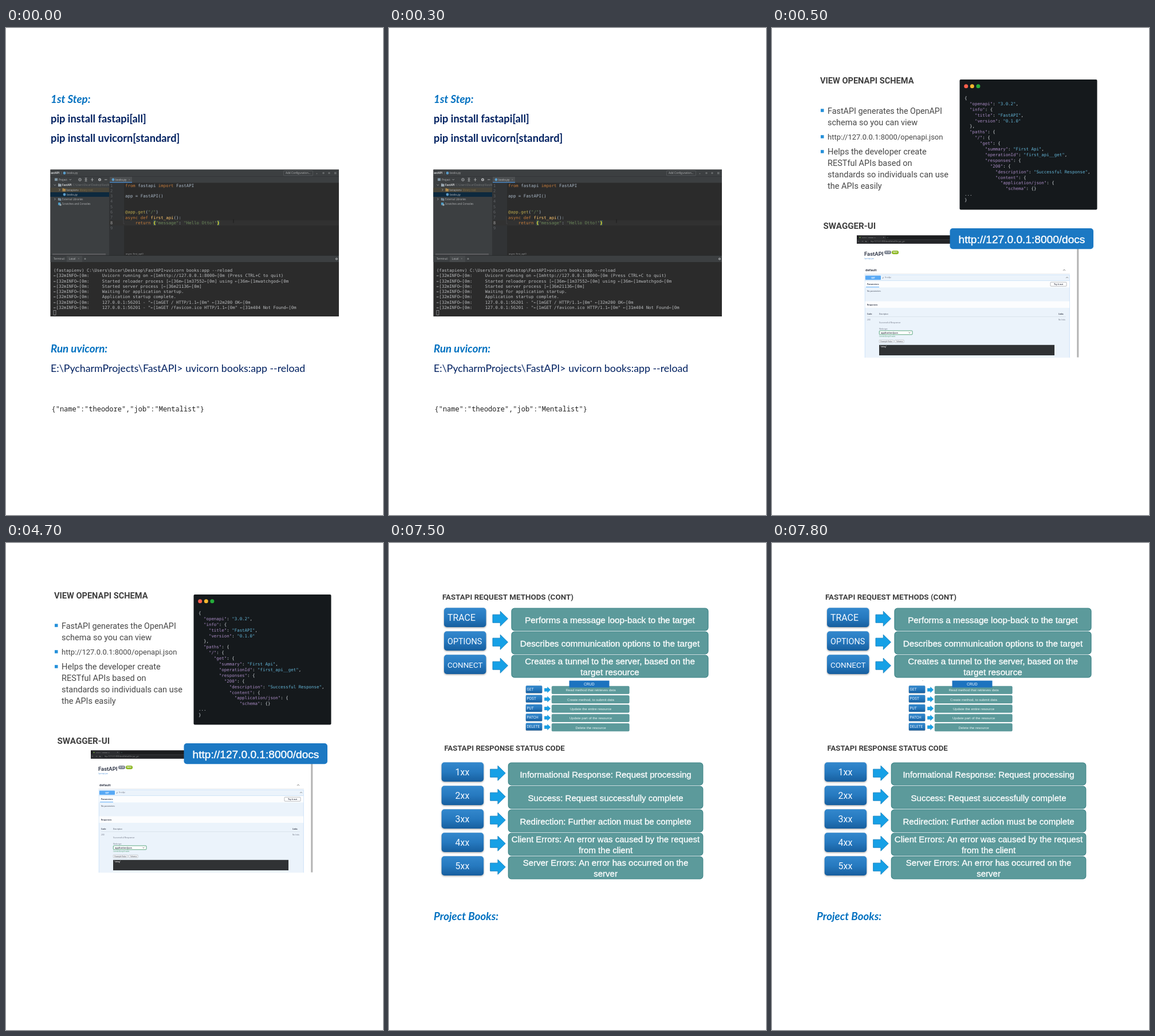
An HTML page with a canvas that plays this animation: 658 by 851 pixels, repeating every 8000 ms.

```html
<!DOCTYPE html>
<html lang="en">
<head>
<meta charset="utf-8">
<title>FastAPI notes</title>
<style>
html, body { margin: 0; width: 100%; height: 100%; overflow: hidden; background: #fff; }
canvas { display: block; width: 658px; height: 851px; }
</style>
</head>
<body>
<canvas id="stage" width="658" height="851"></canvas>
<script>
const ctx = document.getElementById('stage').getContext('2d');
const LATO = 'Lato, sans-serif';
const ROBOTO = 'Roboto, sans-serif';
const ARIAL = '"Liberation Sans", sans-serif';
const OPEN = '"Open Sans", sans-serif';
const MONO = '"DejaVu Sans Mono", monospace';

// y is the middle of the capitals
function text(s, x, y, size, color, family, style = '', align = 'left') {
  ctx.font = `${style} ${size}px ${family}`;
  ctx.textAlign = align;
  ctx.fillStyle = color;
  ctx.fillText(s, x, y + size * 0.36);
}

function runs(x, y, size, parts) {
  for (const [s, color, style] of parts) {
    text(s, x, y, size, color, MONO, style);
    x += ctx.measureText(s).width;
  }
}

function rect(x, y, w, h, color) {
  ctx.fillStyle = color;
  ctx.fillRect(x, y, w, h);
}

function round(x, y, w, h, r, fill, stroke, line = 1) {
  ctx.beginPath();
  ctx.roundRect(x, y, w, h, r);
  if (fill) { ctx.fillStyle = fill; ctx.fill(); }
  if (stroke) { ctx.strokeStyle = stroke; ctx.lineWidth = line; ctx.stroke(); }
}

function dot(x, y, r, color) {
  ctx.beginPath();
  ctx.arc(x, y, r, 0, Math.PI * 2);
  ctx.fillStyle = color;
  ctx.fill();
}

function path(points, color, width = 0.7) {
  ctx.beginPath();
  points.forEach(([x, y]) => ctx.lineTo(x, y));
  ctx.strokeStyle = color;
  ctx.lineWidth = width;
  ctx.stroke();
}

function clipTo(x, y, w, h, draw) {
  ctx.save();
  ctx.beginPath();
  ctx.rect(x, y, w, h);
  ctx.clip();
  draw();
  ctx.restore();
}

/* ---------- setup page ---------- */

function sidebar() {
  const ui = '#b4b6b8';
  const folder = (x, y, c) => { rect(x, y - 2, 5.5, 4.5, c); rect(x, y - 2.8, 2.6, 1, c); };
  rect(77, 279, 103, 8, '#47443a');
  rect(77, 287, 103, 8, '#0d293e');
  path([[83.5, 273.5], [85.2, 275.3], [87, 273.5]], ui);
  folder(91, 274.5, '#9aa7b0');
  text('FastAPI', 98, 274.5, 4.5, '#d0d2d4', OPEN, 'bold');
  text('C:\\Users\\Oscar\\Desktop\\FastAPI', 117, 274.5, 4.4, '#777a7c', OPEN);
  path([[92.5, 281], [94.2, 282.8], [92.5, 284.6]], ui);
  folder(98.5, 283, '#b08a4c');
  text('fastapienv', 105, 283, 4.5, ui, OPEN);
  text('library root', 129, 283, 4.4, '#85754c', OPEN);
  dot(102, 291, 2.4, '#5a9bc8');
  text('books.py', 106, 291, 4.5, '#c4c6c8', OPEN);
  path([[84.5, 297.2], [86.2, 299], [84.5, 300.8]], ui);
  for (let i = 0; i < 3; i++) rect(91 + i * 1.9, 297 + i * 0.4, 1.3, 4.3, '#8fa9bb');
  text('External Libraries', 98, 299, 4.5, ui, OPEN);
  rect(91, 305, 4.2, 4.5, '#4b9bc4');
  dot(95, 309, 1.8, '#9aa7b0');
  text('Scratches and Consoles', 98, 307.3, 4.5, ui, OPEN);
  rect(81, 394, 93, 2.6, '#58595b');
}

function editor() {
  const orange = '#c27a3a', plain = '#a9b7c6', green = '#6a8759', gold = '#b9a64c';
  const row = n => 275 + (n - 1) * 9.32;
  rect(180, 336, 401, 9, '#313131');
  for (let n = 1; n <= 9; n++) text(n, 182, row(n), 7, n === 8 ? '#a4a3a3' : '#606366', MONO);
  const code = {
    1: [['from ', orange], ['fastapi ', plain], ['import ', orange], ['FastAPI', plain]],
    3: [['app = FastAPI()', plain]],
    6: [['@app.get', gold], ['(', plain], ['"/"', green], [')', plain]],
    7: [['async def ', orange], ['first_api', '#ffc66d'], ['():', plain]]
  };
  for (const n in code) runs(208, row(n), 7.4, code[n]);
  rect(257, 336, 4.5, 9, '#3b514d');
  rect(368.5, 336, 4.5, 9, '#3b514d');
  runs(208, row(8), 7.4, [['    return ', orange], ['{', '#ffef28', 'bold'], ['"message"', green],
    [': ', plain], ['"Hello Otto!"', green], ['}', '#ffef28', 'bold']]);
  path([[205, 329], [205, 342], [207, 342]], '#505254', 0.5);
  path([[397, 334.5], [397, 340.5]], '#191919', 0.8);
  text('async first_api()', 209, 394, 4.3, '#a0a2a4', OPEN);
}

function terminal() {
  const lines = [
    'Uvicorn running on ←[1mhttp://127.0.0.1:8000←[0m (Press CTRL+C to quit)',
    'Started reloader process [←[36m←[1m37552←[0m] using ←[36m←[1mwatchgod←[0m',
    'Started server process [←[36m21136←[0m]',
    'Waiting for application startup.',
    'Application startup complete.',
    '127.0.0.1:56201 - "←[1mGET / HTTP/1.1←[0m" ←[32m200 OK←[0m',
    '127.0.0.1:56201 - "←[1mGET /favicon.ico HTTP/1.1←[0m" ←[31m404 Not Found←[0m'
  ];
  rect(77, 398, 504, 11, '#3c3f41');
  rect(106, 398, 27, 11, '#46494b');
  text('Terminal:', 83, 403.5, 4.6, '#b4b6b8', OPEN);
  text('Local', 110, 403.5, 4.6, '#c4c6c8', OPEN);
  text('×', 125.5, 403.5, 4.6, '#85888a', OPEN);
  text('+', 136, 403.5, 7, '#c4c6c8', OPEN);
  dot(577, 403.5, 2, '#a4a6a8');
  dot(577, 403.5, 0.8, '#3c3f41');
  const gray = '#b9bbbd';
  text('(fastapienv) C:\\Users\\Oscar\\Desktop\\FastAPI>uvicorn books:app --reload', 83, 423.3, 7.42, gray, MONO);
  lines.forEach((s, i) => text('←[32mINFO←[0m:     ' + s, 83, 432.6 + i * 9.3, 7.42, gray, MONO));
  ctx.strokeStyle = '#a0a2a4';
  ctx.lineWidth = 0.7;
  ctx.strokeRect(83, 493.5, 4, 8);
}

function ide() {
  const ui = '#b4b6b8';
  rect(77, 247, 504, 257, '#2b2b2b');
  rect(77, 247, 504, 23.5, '#3c3f41');
  rect(77, 270, 103, 127.5, '#3c3f41');
  rect(180, 270, 26, 127.5, '#313335');
  rect(77, 259, 504, 0.7, '#303234');
  rect(77, 397.3, 504, 0.8, '#292b2d');
  text('FastAPI', 75.5, 253.5, 4.8, '#d0d2d4', OPEN, 'bold');
  rect(96.5, 251, 0.6, 5, '#6b6e70');
  dot(102, 253.5, 2.4, '#5a9bc8');
  text('books.py', 106, 253.5, 4.6, ui, OPEN);
  round(484.5, 249.5, 51, 8.5, 1, null, '#616466', 0.6);
  text('Add Configuration...', 488, 253.5, 4.7, ui, OPEN);
  text('▸', 541, 253.5, 6, '#6b6e70', MONO);
  dot(554, 253.5, 1.8, '#66696b');
  dot(564, 253.5, 1.8, '#66696b');
  rect(573, 251.8, 3.6, 3.6, '#66696b');
  // project tool bar
  rect(85, 262.5, 5, 4.6, '#7f96a5');
  text('Project', 92, 265, 4.6, ui, OPEN);
  path([[110.5, 264], [112.2, 265.8], [114, 264]], ui);
  ctx.beginPath();
  ctx.arc(129, 265, 2.3, 0, 7);
  ctx.strokeStyle = ui;
  ctx.lineWidth = 0.9;
  ctx.stroke();
  dot(129, 265, 0.7, ui);
  for (const x of [139.5, 150.5]) {
    path([[x - 2.3, 265], [x + 2.3, 265]], ui, 0.8);
    path([[x, 262], [x, 268]], ui, 0.8);
  }
  path([[137.5, 262.2], [141.5, 262.2]], ui);
  path([[137.5, 267.8], [141.5, 267.8]], ui);
  dot(163.5, 265, 2.5, ui);
  dot(163.5, 265, 0.9, '#3c3f41');
  path([[172, 265], [176.5, 265]], ui, 0.9);
  rect(181, 260, 39, 10, '#4b4e50');
  rect(181, 269, 39, 1.4, '#4a88c7');
  dot(187, 265, 2.4, '#5a9bc8');
  text('books.py', 191, 265, 4.6, '#c4c6c8', OPEN);
  text('×', 214, 265, 4.6, '#85888a', OPEN);
  clipTo(77, 270, 103, 127.5, sidebar);
  editor();
  terminal();
}

function setupPage() {
  const blue = '#0070c0', navy = '#002060', head = 'italic bold';
  text('1st Step:', 78, 124, 18.8, blue, LATO, head);
  text('pip install fastapi[all]', 78, 158, 18.3, navy, LATO, 'bold');
  text('pip install uvicorn[standard]', 78, 192, 18.3, navy, LATO, 'bold');
  clipTo(77.5, 247.5, 503.5, 256.5, ide);
  text('Run uvicorn:', 78, 560.5, 18.8, blue, LATO, head);
  text('E:\\PycharmProjects\\FastAPI> uvicorn books:app --reload', 78, 594.5, 17.8, navy, LATO);
  text('{"name":"theodore","job":"Mentalist"}', 79.5, 665.3, 12, '#222', '"Noto Sans Mono", monospace');
}

/* ---------- schema page ---------- */

const SCHEMA = `{
  "openapi": "3.0.2",
  "info": {
    "title": "FastAPI",
    "version": "0.1.0"
  },
  "paths": {
    "/": {
      "get": {
        "summary": "First Api",
        "operationId": "first_api__get",
        "responses": {
          "200": {
            "description": "Successful Response",
            "content": {
              "application/json": {
                "schema": {}
...
}`.split('\n');

function schemaCard() {
  round(327.5, 90, 240, 227.5, 2, '#15191c');
  ['#fb5f4c', '#f6b62e', '#25ad3b'].forEach((c, i) => dot(338.7 + i * 10.6, 101.7, 3.5, c));
  SCHEMA.forEach((line, i) => {
    const parts = line.match(/"[^"]*"|[^"]+/g).map((s, k, all) => {
      if (s[0] !== '"') return [s, '#d5dade'];
      return [s, (all[k + 1] || '')[0] === ':' ? '#a98bc4' : '#63b4d6'];
    });
    runs(336, 122.3 + i * 9.9, 7.45, parts);
  });
}

function docsShot() {
  const ink = '#3b4151', soft = '#6b7180';
  const small = (s, x, y, size, style, color = ink) => text(s, x, y, size, color, OPEN, style);
  rect(148, 362.5, 170, 14.5, '#2c2d30');
  rect(148, 362.5, 170, 6.5, '#1c1d1f');
  rect(151, 363.5, 48, 5.5, '#2c2d30');
  dot(153.5, 366, 1.1, '#6fa83c');
  small('FastAPI - Swagger UI', 157, 366, 2.5, '', '#c8c8c8');
  small('×', 194, 366, 3, '', '#ddd');
  small('+', 201, 366, 3.4, '', '#6fb0a0');
  ['←', '→', '↻'].forEach((s, i) => text(s, 150 + i * 6.5, 373, 4, '#bbb', MONO));
  rect(169, 371, 142, 4.3, '#232427');
  small('http://127.0.0.1:8000/docs#/default/first_api__get', 172, 373, 2.6, '', '#999');

  rect(532.3, 386, 3, 189.5, '#b3b3b3');
  text('FastAPI', 161, 394.7, 9.5, ink, ROBOTO, 'bold');
  round(196, 389, 12, 6.2, 3, '#7d8492');
  small('0.1.0', 198.6, 392.1, 3, 'bold', '#fff');
  round(209, 389, 12, 6.2, 3, '#89b51c');
  small('OAS3', 211, 392.1, 3, 'bold', '#fff');
  small('/openapi.json', 161, 402.7, 2.7, '', '#4f93d8');

  text('default', 163, 423.2, 6.2, ink, ROBOTO, 'bold');
  path([[508, 424], [510, 422], [512, 424]], '#555');
  rect(161, 429.3, 359, 0.5, '#d4d8de');
  rect(162, 431, 357.5, 145, '#ebf3fb');
  path([[162.2, 576], [162.2, 431.2], [519.3, 431.2], [519.3, 576]], '#a9cff5', 0.5);
  round(163, 432.7, 27, 7.3, 1, '#58a9f5');
  text('GET', 176.5, 436.3, 3.6, '#fff', OPEN, 'bold', 'center');
  small('/', 193, 436.3, 3.8, 'bold');
  small('First Api', 197, 436.3, 2.9, '', soft);
  path([[513, 437], [515, 435.2], [517, 437]], '#555', 0.6);

  rect(162.5, 442, 356.5, 11.3, '#fcfdfe');
  rect(162.5, 441.5, 356.5, 0.5, '#b5d5f2');
  small('Parameters', 166, 447.3, 3.5, 'bold');
  rect(164, 452.2, 23, 1, '#58a9f5');
  round(486, 444.2, 28, 7, 1, '#fff', '#8a8d95', 0.6);
  text('Try it out', 500, 447.7, 3.6, ink, OPEN, 'bold', 'center');
  small('No parameters', 166, 460.2, 3.4);
  rect(162.5, 477.5, 356.5, 11.5, '#fcfdfe');
  small('Responses', 166, 483.4, 3.5, 'bold');

  small('Code', 166, 499.5, 3.4, 'bold');
  small('Description', 187, 499.5, 3, '');
  small('Links', 500, 499.5, 3.3, 'bold');
  rect(166, 504, 347, 0.5, '#c9d2dc');
  small('200', 166, 510, 3.3, '', soft);
  small('No links', 500, 510, 3.2, '', soft);
  small('Successful Response', 187, 514.2, 3.9, '', soft);
  small('Media type', 187, 526.3, 2.8, '', soft);
  round(187.3, 529, 57.7, 6.8, 1, '#fff', '#4b9d72', 0.9);
  small('application/json', 190, 532.4, 3.7, 'bold');
  path([[238.5, 531.8], [240, 533.2], [241.5, 531.8]], '#333', 0.6);
  small('Controls Accept header.', 187, 538.6, 2.6, '', '#4b9d72');
  round(187.2, 545, 25, 5, 0.6, '#f3f5f7', '#a7abb0', 0.5);
  small('Example Value', 189.5, 547.5, 3);
  round(214.2, 545, 16, 5, 0.6, '#f3f5f7', '#a7abb0', 0.5);
  small('Schema', 217, 547.5, 3);
  rect(187, 553.8, 306, 18.2, '#303234');
  small('"string"', 189, 557, 2.9, 'bold', '#d5d5d5');
}

function schemaPage() {
  const gray = '#484848';
  text('VIEW OPENAPI SCHEMA', 84, 92, 14.6, '#3f3f3f', ROBOTO, 'bold');
  for (const y of [141.3, 187.2, 213.2]) rect(85, y, 5.5, 5.5, '#2490da');
  [['FastAPI generates the OpenAPI', 144.5, 14.35], ['schema so you can view', 164.8, 14.5],
   ['http://127.0.0.1:8000/openapi.json', 190, 13],
   ['Helps the developer create', 215.8, 14.6], ['RESTful APIs based on', 236, 14.5],
   ['standards so individuals can use', 256, 14.55], ['the APIs easily', 276, 14.5]]
    .forEach(([s, y, size]) => text(s, 97, y, size, gray, ROBOTO));
  schemaCard();
  text('SWAGGER-UI', 89.5, 345.5, 15.2, '#3f3f3f', ROBOTO, 'bold');
  docsShot();
  round(310.5, 350, 250.5, 36.3, 5, '#1b78c3');
  label('http://127.0.0.1:8000/docs', 436, 369, 19.1);
}

/* ---------- methods page ---------- */

// white centred text, slightly heavier than regular
function label(s, x, y, size) {
  text(s, x, y, size, '#fff', ARIAL, '', 'center');
  ctx.strokeStyle = '#fff';
  ctx.lineWidth = size * 0.022;
  ctx.strokeText(s, x, y + size * 0.36);
}

function button(x, y, w, h, r) {
  const g = ctx.createLinearGradient(0, y, 0, y + h);
  g.addColorStop(0, '#3388cd');
  g.addColorStop(0.5, '#2679bf');
  g.addColorStop(1, '#175f9f');
  ctx.save();
  ctx.shadowColor = 'rgba(0,0,0,.35)';
  ctx.shadowBlur = r * 0.6;
  ctx.shadowOffsetY = r * 0.25;
  round(x, y, w, h, r, g);
  ctx.restore();
}

function arrow(x, y, w, h) {
  const s = h * 0.27, n = w * 0.5;
  ctx.beginPath();
  [[0, -s], [n, -s], [n, -h / 2], [w, 0], [n, h / 2], [n, s], [0, s]]
    .forEach(([dx, dy]) => ctx.lineTo(x + dx, y + dy));
  ctx.closePath();
  ctx.fillStyle = '#16a0e6';
  ctx.fill();
  ctx.strokeStyle = '#1780bd';
  ctx.lineWidth = h * 0.035;
  ctx.stroke();
}

// nameX: left edge of the button text; boxX, boxW: the wide box
function bigRow(x, y, nameX, boxX, boxW, name, size, lines, textSize) {
  button(x, y, 73.5, 33.8, 5);
  text(name, nameX, y + 17.5, size, '#f4f9ff', ROBOTO);
  arrow(x + 85, y + 19, 26.5, 26);
  round(boxX, y + 1, boxW, 38.6, 5, '#5c9a9b', '#3d8487', 1.2);
  const cx = boxX + boxW / 2;
  if (lines.length === 1) label(lines[0], cx, y + 21, textSize);
  else lines.forEach((s, i) => label(s, cx, y + 11 + i * 19.5, textSize));
}

function crud() {
  const rows = [['GET', 'Read method that retrieves data'], ['POST', 'Create method, to submit data'],
    ['PUT', 'Update the entire resource'], ['PATCH', 'Update part of the resource'],
    ['DELETE', 'Delete the resource']];
  rows.forEach(([name, info], i) => {
    const y = 249.3 + i * 16.3;
    button(238.8, y, 28.5, 13, 1.5);
    text(name, 240.5, y + 6.4, 6.5, '#e4effa', ROBOTO);
    arrow(271.3, y + 7.3, 10.5, 10);
    round(284.2, y + 1, 135, 13.3, 1.5, '#5c9a9b', '#3d8487', 0.6);
    text(info, 352, y + 8, 6.1, '#eaf4f3', ARIAL, '', 'center');
  });
  rect(314.5, 240.5, 70, 12, '#1c73bf');
  text('CRUD', 349.5, 246.4, 7.3, '#e8f2fb', ROBOTO, '', 'center');
  dot(263, 240.5, 0.5, '#888');
}

function methodsPage() {
  text('FASTAPI REQUEST METHODS (CONT)', 93, 93.7, 13.4, '#3f3f3f', ROBOTO, 'bold');
  [['TRACE', 15.9, ['Performs a message loop-back to the target']],
   ['OPTIONS', 14.4, ['Describes communication options to the target']],
   ['CONNECT', 13.5, ['Creates a tunnel to the server, based on the', 'target resource']]]
    .forEach(([name, size, lines], i) =>
      bigRow(96, 113.2 + i * 41, 102, 214, 343, name, size, lines, 15.25));
  crud();
  text('FASTAPI RESPONSE STATUS CODE', 96.5, 358, 13.2, '#3f3f3f', ROBOTO, 'bold');
  [['Informational Response: Request processing'],
   ['Success: Request successfully complete'],
   ['Redirection: Further action must be complete'],
   ['Client Errors: An error was caused by the request', 'from the client'],
   ['Server Errors: An error has occurred on the', 'server']]
    .forEach((lines, i) =>
      bigRow(91.7, 383.2 + i * 41, 115.5, 208.3, 339.5, `${i + 1}xx`, 16, lines, 15));
  text('Project Books:', 78, 652.5, 18.8, '#0070c0', LATO, 'italic bold');
}

/* ---------- timing ---------- */

const LOOP = 8000;
const pages = [[0, setupPage], [500, schemaPage], [7500, methodsPage]];
const start = performance.now();
let shown = null;

function frame() {
  const t = (performance.now() - start) % LOOP;
  const page = pages.filter(([from]) => t >= from).pop()[1];
  if (page !== shown) {
    rect(0, 0, 658, 851, '#fff');
    page();
    shown = page;
  }
  requestAnimationFrame(frame);
}
frame();
</script>
</body>
</html>
```
